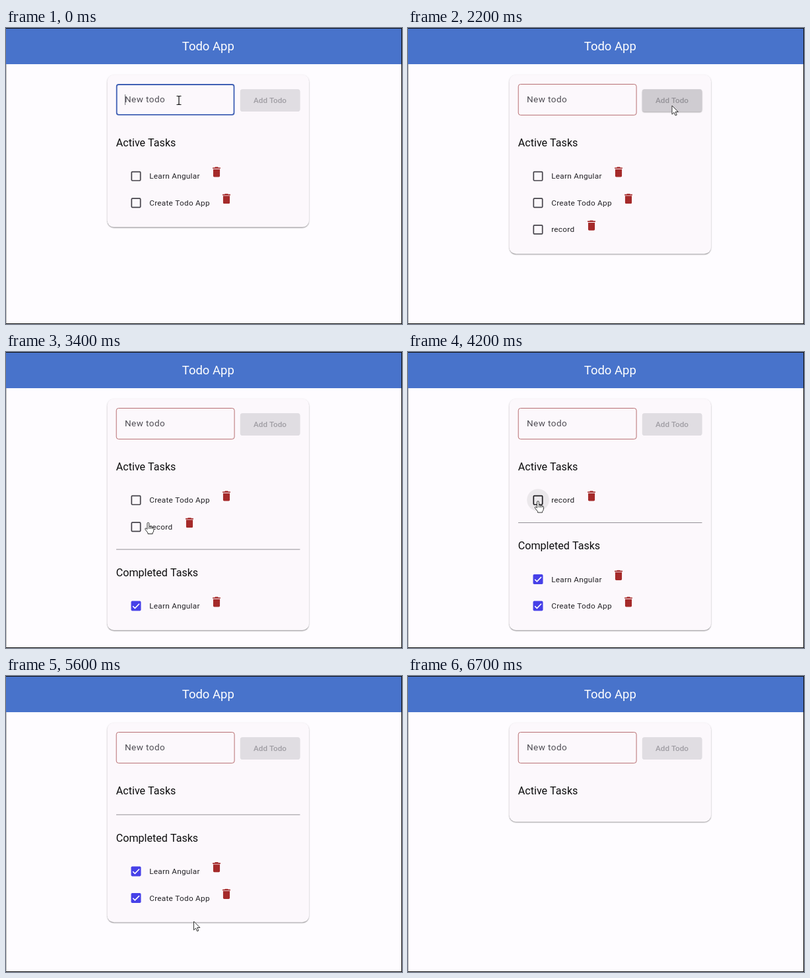
Recreate the animation shown at these times as an HTML page with a canvas. Size 600 by 450 pixels, loop 7.9 s.

```html
<!DOCTYPE html>
<html lang="en">
<head>
<meta charset="utf-8">
<title>Todo App</title>
<style>
  html, body { margin: 0; width: 100%; height: 100%; overflow: hidden; background: #fefcff; }
  canvas { display: block; }
</style>
</head>
<body>
<canvas id="stage" width="600" height="450"></canvas>
<script>
const ctx = document.getElementById('stage').getContext('2d');
const LOOP = 7900, STEP = 100, ROW = 40.6;

const CARD = '#fcf8fc', BLUE = '#3f5fb4', INK = '#1c1b1f';
const TRASH = new Path2D('M6 19c0 1.1.9 2 2 2h8c1.1 0 2-.9 2-2V7H6v12zM19 4h-3.5l-1-1h-5l-1 1H5v2h14V4z');
const CURSORS = {
  arrow: new Path2D('M0 0V13.2L3.1 10.4L5.2 15L7.3 14.1L5.2 9.5H9.4Z'),
  hand: new Path2D('M-1.5 10V1.2a1.4 1.4 0 0 1 2.8 0V6q2-1 2.8.6 2-.8 2.5.7 1.8-.4 1.8 1.5V11q0 3-1.8 4.5V17H-.5V15.5L-4.6 10.2q-.5-2 1.2-1.8z'),
  beam: new Path2D('M-3.5 -6.5H-1L0 -5.8L1 -6.5H3.5M0 -5.8V5.8M-3.5 6.5H-1L0 5.8L1 6.5H3.5')
};

// Lifetimes in ms: added, completed, deleted
const TASKS = [
  { text: 'Learn Angular', trashX: 319, added: 0, done: 3100, gone: 6400 },
  { text: 'Create Todo App', trashX: 334, added: 0, done: 4000, gone: 6000 },
  { text: 'record', trashX: 278, added: 2100, done: 4800, gone: 5500 }
];

const TYPING = [[0, ''], [200, 'r'], [400, 're'], [600, 'rec'], [800, 'reco'], [900, 'recod'],
  [1000, 'reco'], [1300, 'recor'], [1400, 'record'], [2100, '']];

// time, x, y, cursor shape
const POINTER = [
  [0, 262, 110, 'beam'], [1600, 262, 110, 'beam'], [1900, 372, 115, 'hand'], [2000, 398, 118, 'hand'],
  [2100, 400, 118, 'arrow'], [2400, 400, 118, 'arrow'], [2600, 345, 156, 'arrow'], [2800, 207, 220, 'hand'],
  [2900, 197, 227, 'hand'], [3200, 197, 227, 'hand'], [3400, 215.5, 259.5, 'hand'], [3600, 206, 243, 'hand'],
  [3800, 197, 227, 'hand'], [4800, 197, 227, 'hand'], [4900, 206, 246, 'arrow'], [5300, 276, 364, 'hand'],
  [5400, 284, 373, 'hand'], [5500, 284.5, 373, 'arrow'], [5600, 284.5, 373, 'arrow'], [5900, 334, 330, 'hand'],
  [6000, 334, 330, 'arrow'], [6200, 320, 290, 'hand'], [6400, 320, 290, 'arrow'],
  [6500, 325, 220, 'arrow'], [6600, 334, 64, 'arrow'], [6700, 0, 0, null]
];

const clamp = v => Math.max(0, Math.min(1, v));
const latest = (keys, t) => keys.findLast(k => k[0] <= t);

function rounded(x, y, w, h, r, fill, stroke, width) {
  ctx.beginPath();
  ctx.roundRect(x, y, w, h, r);
  if (fill) { ctx.fillStyle = fill; ctx.fill(); }
  if (stroke) { ctx.strokeStyle = stroke; ctx.lineWidth = width; ctx.stroke(); }
}

function raised(x, y, w, h, r, fill, strength = 1) {
  ctx.save();
  for (const [offset, blur, alpha] of [[1.4, 1.2, .28], [.8, 2.6, .16]]) {
    ctx.shadowColor = `rgba(0,0,0,${alpha * strength})`;
    ctx.shadowOffsetY = offset;
    ctx.shadowBlur = blur;
    rounded(x, y, w, h, r, fill);
  }
  ctx.restore();
}

function label(text, x, y, size, color, { weight = 400, spacing = 0, align = 'left' } = {}) {
  ctx.font = `${weight} ${size}px Roboto, sans-serif`;
  ctx.letterSpacing = spacing + 'px';
  ctx.textAlign = align;
  ctx.fillStyle = color;
  ctx.fillText(text, x, y);
}

function pointerAt(t) {
  const i = POINTER.findLastIndex(k => k[0] <= t);
  const [start, x, y, shape] = POINTER[i];
  const next = POINTER[i + 1];
  if (!next || !next[3]) return { x, y, shape };
  const p = (t - start) / (next[0] - start);
  return { x: x + (next[1] - x) * p, y: y + (next[2] - y) * p, shape };
}

function drawPointer({ x, y, shape }) {
  if (!shape) return;
  ctx.save();
  ctx.translate(x, y);
  ctx.lineJoin = 'round';
  if (shape === 'beam') {
    ctx.strokeStyle = '#111';
    ctx.lineWidth = 1.2;
  } else {
    ctx.fillStyle = '#fff';
    ctx.fill(CURSORS[shape]);
    ctx.strokeStyle = '#333';
    ctx.lineWidth = 1;
  }
  ctx.stroke(CURSORS[shape]);
  if (shape === 'hand') {
    ctx.beginPath();
    for (const fx of [1.3, 3.7, 6]) { ctx.moveTo(fx, 6.5); ctx.lineTo(fx, 9.5); }
    ctx.stroke();
  }
  ctx.restore();
}

function drawTask(task, y, done, pointer) {
  const hover = pointer.shape === 'hand' && Math.hypot(pointer.x - 197, pointer.y - y) < 12;
  if (hover) {
    ctx.beginPath();
    ctx.arc(197, y, 16.8, 0, 7);
    ctx.fillStyle = 'rgba(28,27,31,.075)';
    ctx.fill();
  }
  if (done) {
    rounded(189.5, y - 7.4, 15, 15, 1.8, '#4640e8');
    ctx.beginPath();
    ctx.moveTo(192.2, y + .4);
    ctx.lineTo(195.4, y + 3.5);
    ctx.lineTo(202, y - 3.3);
    ctx.strokeStyle = '#fff';
    ctx.lineWidth = 1.6;
    ctx.stroke();
  } else {
    rounded(190.3, y - 6.4, 13.4, 13.4, 1.2, null, hover ? INK : '#45434a', 1.7);
  }
  label(task.text, 217.2, y + 4.2, 11.8, '#232226', { spacing: .26 });
  ctx.save();
  ctx.translate(task.trashX, y - 6.1);
  ctx.scale(.844, .844);
  ctx.translate(-12, -12);
  ctx.fillStyle = '#a52a2a';
  ctx.fill(TRASH);
  ctx.restore();
}

function drawForm(t) {
  const focused = t < 2000;
  if (focused) rounded(167.7, 86, 177.8, 45.8, 3, null, BLUE, 1.8);
  else rounded(167.2, 85.5, 178.9, 46.9, 3.4, null, '#b86f72', 1);

  const typed = latest(TYPING, t)[1];
  label(typed || 'New todo', 180, 113.4, 13.5, typed ? '#333138' : '#504e55', { spacing: .45 });
  if (t < 100) {
    ctx.fillStyle = '#77757c';
    ctx.fillRect(180, 101, 1, 16);
  }

  const submitted = t >= 2100;
  const enabled = submitted ? 0 : clamp((t - 200) / 280);
  const lift = submitted ? clamp(1 - (t - 2100) / 300) : enabled;
  raised(354.9, 93.3, 90.5, 33.7, 3.4, '#e0dde2', lift);
  label('Add Todo', 400, 114.2, 11.8, '#a09ea4', { weight: 500, align: 'center' });
  if (enabled) {
    ctx.globalAlpha = enabled;
    rounded(354.9, 93.3, 90.5, 33.7, 3.4, CARD);
    label('Add Todo', 400, 114.2, 11.8, '#4460b0', { weight: 500, align: 'center' });
    ctx.globalAlpha = 1;
  }
  if (submitted && lift) rounded(354.9, 93.3, 90.5, 33.7, 3.4, `rgba(28,27,31,${.13 * lift})`);
}

function draw(t) {
  const present = TASKS.filter(k => t >= k.added && t < k.gone);
  const active = present.filter(k => t < k.done);
  const completed = present.filter(k => t >= k.done);
  const divider = active.length ? 218.4 + ROW * active.length : 210.4;
  const bottom = completed.length ? divider + 82.6 + ROW * completed.length : 221.4 + ROW * active.length;
  const pointer = pointerAt(t);

  ctx.fillStyle = '#fefcff';
  ctx.fillRect(0, 0, 600, 450);
  ctx.fillStyle = '#4873cb';
  ctx.fillRect(0, 0, 600, 55);
  label('Todo App', 306.3, 34.2, 18.5, '#fff', { align: 'center' });

  raised(153.5, 71.3, 305.6, bottom - 71.3, 10, CARD);
  drawForm(t);
  label('Active Tasks', 166.8, 180.4, 16.1, '#0c0c0d');
  active.forEach((task, i) => drawTask(task, 225 + ROW * i, false, pointer));

  if (completed.length) {
    ctx.fillStyle = '#949197';
    ctx.fillRect(167, divider, 278.5, 1);
    label('Completed Tasks', 166.8, divider + 41.4, 16.1, '#0c0c0d');
    completed.forEach((task, i) => drawTask(task, divider + 86.4 + ROW * i, true, pointer));
  }
  drawPointer(pointer);

  ctx.fillStyle = '#bbb';
  ctx.fillRect(0, 55, 1, 395);
  ctx.fillStyle = '#111';
  ctx.fillRect(0, 0, 600, 1);
  ctx.fillRect(599, 0, 1, 450);
  ctx.fillRect(0, 449, 600, 1);
}

const start = performance.now();
function tick() {
  const t = (performance.now() - start) % LOOP;
  draw(Math.floor(t / STEP) * STEP);
  requestAnimationFrame(tick);
}
tick();
</script>
</body>
</html>
```
